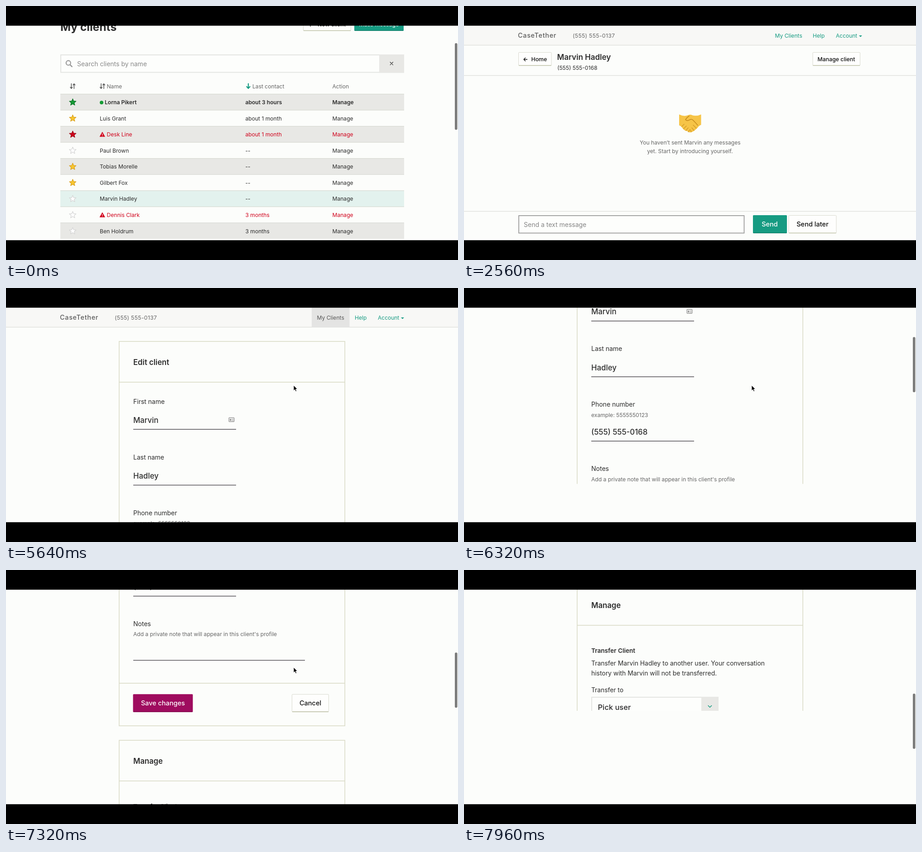
Animation, 998 px wide and 561 px high, one loop 8 s. Source, as an HTML page:

```html
<!DOCTYPE html>
<html lang="en">
<head>
<meta charset="utf-8">
<title>Client messaging walkthrough</title>
<style>
  html, body { margin: 0; width: 100%; height: 100%; overflow: hidden; background: #000; }
  svg { display: block; width: 100vw; height: 100vh; }
  text { font-family: Inter, "Liberation Sans", sans-serif; white-space: pre; }
</style>
</head>
<body>
<svg id="stage" viewBox="0 0 998 561"></svg>
<script>
const LOOP = 8000;
const PAPER = '#fcfdfb', INK = '#2c2c2c', GREY = '#666', TEAL = '#169b82', RED = '#d0021b', PANEL = '#dcddca';
const PERSON = { first: 'Marvin', last: 'Hadley', phone: '(555) 555-0168' };
const FULL_NAME = `${PERSON.first} ${PERSON.last}`;

// --- drawing helpers: text y is the middle of the capitals ---
const text = (x, y, size, str, { fill = INK, weight = 400, anchor = 'start', gap = 0 } = {}) =>
  `<text x="${x}" y="${y + size * 0.364}" font-size="${size}" font-weight="${weight}" fill="${fill}" text-anchor="${anchor}" letter-spacing="${gap}">${str}</text>`;
const rect = (x, y, w, h, fill, extra = '') =>
  `<rect x="${x}" y="${y}" width="${w}" height="${h}" fill="${fill}" ${extra}/>`;
const path = (d, fill, extra = '') => `<path d="${d}" fill="${fill}" ${extra}/>`;
const line = (x1, x2, y, color, width = 1) => rect(x1, y - width / 2, x2 - x1, width, color);
const stroke = (d, color, width) =>
  path(d, 'none', `stroke="${color}" stroke-width="${width}" stroke-linecap="round" stroke-linejoin="round"`);
const group = (id, body) => `<g id="${id}">${body}</g>`;

const outlineButton = (x, y, w, h) =>
  rect(x + .5, y + .5, w - 1, h - 1, '#fefefd', 'rx="1.5" stroke="#d9dacf"') + line(x + 1, x + w - 1, y + h - .6, '#b9bda0', 1.4);
const solidButton = (x, y, w, h, fill, shade) =>
  rect(x, y, w, h, fill, 'rx="1.5"') + line(x + 1, x + w - 1, y + h - .6, shade, 1.2);

function star(cx, cy, fill, edge) {
  const points = Array.from({ length: 10 }, (_, i) => {
    const r = i % 2 ? 3.5 : 7.8, a = i * Math.PI / 5 - Math.PI / 2;
    return `${(cx + r * Math.cos(a)).toFixed(2)},${(cy + r * Math.sin(a)).toFixed(2)}`;
  });
  return `<polygon points="${points.join(' ')}" fill="${fill}" stroke="${edge}" stroke-width="1.2" stroke-linejoin="round"/>`;
}
const warning = (x, y) =>
  path(`M${x + 5.7} ${y - 5.5}l5.7 10.3h-11.4z`, RED, `stroke="${RED}" stroke-linejoin="round" stroke-width=".6"`) +
  rect(x + 5.1, y - 2, 1.2, 3.4, '#fff') + rect(x + 5.1, y + 2.3, 1.2, 1.2, '#fff');
const sortIcon = (x, y) =>
  stroke(`M${x + 3} ${y - 5.5}v10.5m-2.3-2.6l2.3 2.8l2.3-2.8M${x + 9} ${y + 5.5}v-10.5m-2.3 2.6l2.3-2.8l2.3 2.8`, '#555', 1.5);

// --- client list ---
const TONES = {
  green: ['#159b35', '#0b7425'], gold: ['#f8c630', '#d9a01d'],
  red: ['#d0021b', '#9c0014'], none: ['#fefefe', '#d4d4d4']
};
const SHADE = '#e8e8e5';
const CLIENTS = [
  ['Lorna Pikert', 'about 3 hours', 'green', SHADE, 'new'],
  ['Luis Grant', 'about 1 month', 'gold', PAPER],
  ['Desk Line', 'about 1 month', 'red', SHADE, 'alert'],
  ['Paul Brown', '--', 'none', PAPER],
  ['Tobias Morelle', '--', 'gold', SHADE],
  ['Gilbert Fox', '--', 'gold', PAPER],
  [FULL_NAME, '--', 'none', '#e3f2ee'],
  ['Dennis Clark', '3 months', 'none', PAPER, 'alert'],
  ['Ben Holdrum', '3 months', 'none', SHADE]
];

function clientRow([name, contact, tone, back, state], i) {
  const top = 194.5 + i * 35.55, y = top + 18.2;
  const style = { fill: state === 'alert' ? RED : INK, weight: state === 'new' ? 600 : 400 };
  const nameX = { new: 218, alert: 222.5 }[state] || 207;
  const badge = state === 'new' ? `<circle cx="211" cy="${y + .6}" r="4" fill="#159b35"/>`
    : state === 'alert' ? warning(207, y) : '';
  return rect(120, top, 759, 35.55, back) + line(120, 879, top, '#d3d5cd') +
    star(147.3, y, ...TONES[tone]) + badge +
    text(nameX, y, 12.1, name, style) + text(528.5, y, 12.1, contact, style) + text(720.5, y, 12.1, 'Manage', style);
}

const listPage = () =>
  text(120, 46, 24.6, 'My clients', { weight: 700 }) +
  outlineButton(656, 20, 106, 35) + stroke('M668 41h8m-4-4v8', INK, 1.4) +
  text(688, 41, 12.3, 'New client', { weight: 500, fill: '#111' }) +
  solidButton(769, 20, 109, 35, TEAL, '#0f7a66') +
  text(823.5, 41, 12.3, 'Mass message', { weight: 500, fill: '#fff', anchor: 'middle' }) +
  rect(121, 108, 757, 38.5, '#fdfefc', 'stroke="#e4e5e2" stroke-width="2"') + rect(824, 107, 55, 40.5, SHADE) +
  stroke('M848.2 124l6.2 6.2m0-6.2l-6.2 6.2', '#333', 1.2) +
  `<circle cx="137.7" cy="125.7" r="5" fill="none" stroke="#999" stroke-width="2.2"/>` + stroke('M141.6 129.8l4 4', '#999', 2.6) +
  text(157, 127.7, 14, 'Search clients by name', { fill: '#888' }) +
  sortIcon(141.3, 177) + sortIcon(207, 177) + text(222.5, 178, 12.1, 'Name', { fill: GREY }) +
  stroke('M535 171.5v10m-3.6-3.4l3.6 4l3.6-4', TEAL, 2.2) +
  text(544, 178, 12.1, 'Last contact', { fill: GREY }) + text(720.5, 178, 12.1, 'Action', { fill: GREY }) +
  CLIENTS.map(clientRow).join('');

// --- shared navigation ---
const nav = active =>
  rect(0, 43, 998, 43.5, '#f8f8f6') + line(0, 998, 86.5, '#dededb', 1.4) +
  (active ? rect(675, 43, 83.5, 43.5, '#e4e4e3') : '') +
  text(119, 65, 14.4, 'CaseTether', { fill: '#5c5c5c', weight: 500, gap: .7 }) +
  text(240, 65.3, 12.3, '(555) 555-0137', { fill: GREY, gap: .3 }) +
  text(686.5, 65.3, 12.1, 'My Clients', { fill: active ? '#555' : TEAL }) +
  text(770, 65.3, 12.1, 'Help', { fill: TEAL }) + text(821, 65.3, 12, 'Account', { fill: TEAL }) +
  path('M872 65h7l-3.5 3.6z', TEAL);

// --- conversation ---
const handshake = () =>
  path('M475 239.5q11 5.5 20 1.5q5-2 9 .2q10 3 19.500-1.700v23q-5 2-7 5.500q-6 7-14 10.500q-6 2-9-2q-8-1-12-8q-3-4-6.500-5z', '#f6c447') +
  stroke('M497 243q-5 3-8 8q3 4 9 .5q5-3 8 1q6 6 10 11', '#c58a1c', 1.5) +
  stroke('M481 266l5-5m-1 10l6-6m-1 10l5-6m0 9l4-5M502 278l-2-4m8 1l-5-6m10 1l-7-7', '#d59b27', 1.5);

const chatPage = () => nav(false) +
  outlineButton(120, 102, 73.5, 30) + stroke('M139.500 118h-7.500m3.400-3.400l-3.400 3.400l3.400 3.400', '#111', 1.4) +
  text(148.500, 117.5, 12.3, 'Home', { weight: 500, fill: '#111' }) +
  text(205.5, 112.5, 17, FULL_NAME, { weight: 600 }) + text(206, 136.5, 12.1, PERSON.phone) +
  outlineButton(769.5, 102, 105.5, 30) +
  rect(770.2, 102.7, 104, 28, '#d8d9cd', 'id="press" stroke-width="1.500"') +
  text(822, 117.5, 12.3, 'Manage client', { weight: 500, fill: '#111', anchor: 'middle' }) +
  line(0, 998, 153.5, '#dededb', 1.4) + handshake() +
  text(499.3, 301.5, 12.1, `You haven’t sent ${PERSON.first} any messages`, { fill: GREY, anchor: 'middle' }) +
  text(499, 320.5, 12.1, 'yet. Start by introducing yourself.', { fill: GREY, anchor: 'middle' }) +
  line(0, 998, 453.5, '#dededb', 1.4) +
  rect(121, 463, 497.5, 38.5, '#fdfefc', 'stroke="#9b9b9b" stroke-width="1.8"') +
  text(132, 483, 14, 'Send a text message', { fill: '#858585' }) +
  solidButton(638, 462, 75, 40, TEAL, '#0f7a66') +
  text(675, 482, 14.5, 'Send', { weight: 500, fill: '#fff', anchor: 'middle' }) +
  outlineButton(716.5, 462, 106, 40) +
  text(769.5, 482, 14.6, 'Send later', { weight: 500, fill: '#111', anchor: 'middle' });

// --- edit form, laid out in unscrolled coordinates ---
const panel = (y, h) => rect(249.8, y, 498.4, h, 'none', `stroke="${PANEL}" stroke-width="1.7"`);
const field = (label, labelY, value, valueY) =>
  text(281, labelY, 14, label) + text(281, valueY, 16.8, value, { weight: 500 }) + line(281, 508, valueY + 20.7, '#5d5a60', 1.6);

const editPage = () => nav(true) +
  panel(118, 746) + text(281, 163.5, 16.7, 'Edit client', { weight: 600 }) + line(250, 748, 208, PANEL, 1.7) +
  field('First name', 250.5, PERSON.first, 291.5) +
  rect(492.2, 286.5, 11.5, 8.8, 'none', 'rx="1" stroke="#999" stroke-width="1.400"') +
  rect(494, 289, 3.4, 4.4, '#999') + stroke('M499 289.3h3m-3 2h3m-3 2h3', '#999', .9) +
  field('Last name', 373.5, PERSON.last, 414.7) +
  field('Phone number', 496.5, PERSON.phone, 556.8) + text(281, 519.5, 12.1, 'example: 5555550123', { fill: GREY }) +
  text(281, 638.5, 14, 'Notes') +
  text(281, 661.500, 12.1, 'Add a private note that will appear in this client\'s profile', { fill: GREY }) +
  line(281, 660, 719.3, '#5d5a60', 1.6) + line(250, 748, 770, PANEL, 1.7) +
  solidButton(280.5, 794, 132, 39.5, '#9f0c5f', '#7a0748') +
  text(346.5, 813.2, 14.5, 'Save changes', { weight: 500, fill: '#fff', anchor: 'middle' }) +
  outlineButton(631, 794, 82, 39.5) + text(672, 813.2, 14.5, 'Cancel', { weight: 500, fill: '#111', anchor: 'middle' }) +
  panel(896, 620) + text(281, 941.5, 16.7, 'Manage', { weight: 600 }) + line(250, 748, 985.7, PANEL, 1.7) +
  text(281, 1041.8, 13.6, 'Transfer Client', { weight: 600 }) +
  text(281, 1069.7, 13.9, `Transfer ${FULL_NAME} to another user. Your conversation`) +
  text(281, 1091.7, 13.9, `history with ${PERSON.first} will not be transferred.`) +
  text(281, 1128.8, 13.8, 'Transfer to') +
  rect(282, 1144.5, 279, 44, '#fdfefc', 'stroke="#e4e5e2" stroke-width="2"') + rect(524, 1143.500, 38, 46, SHADE) +
  text(295.5, 1166, 16.5, 'Pick user', { weight: 500 }) + stroke('M539.200 1163l3.700 3.700l3.700-3.700', TEAL, 1.6);

const arrow = path('M0 0v11.800l2.700-2.500l1.900 4.200l2.100-.9l-1.900-4.100h3.700z', '#000', 'stroke="#fff" stroke-width=".9"');
const hand = path('M-2.500-6q1.600-1 2 .8l.6 3q1.200-.9 2 .1q1.200-.6 1.900.4q1.500-.3 1.700 1.500q.2 4-1.600 6.300h-5.800q-1.200-2.500-3.200-4.600q-.6-1.700 1.200-1.300l1.700 1.200z', '#fff', 'stroke="#222" stroke-width="1"');

const stage = document.getElementById('stage');
stage.innerHTML = rect(0, 43, 998, 475, PAPER) +
  group('list', listPage()) + group('chat', chatPage()) +
  group('edit', editPage() + rect(0, 0, 998, 1100, PAPER, 'id="unpainted"')) +
  rect(991, 0, 5.5, 122, '#7b7b7b', 'id="bar" rx="2.700"') + group('arrow', arrow) + group('hand', hand) +
  rect(0, 0, 998, 43.5, '#000') + rect(0, 517.3, 998, 44, '#000');

const el = Object.fromEntries([...stage.querySelectorAll('[id]')].map(n => [n.id, n]));
const set = (node, attrs) => Object.entries(attrs).forEach(([k, v]) => node.setAttribute(k, v));
const show = (node, on) => node.setAttribute('visibility', on ? 'visible' : 'hidden');

// --- motion ---
const clamp = v => Math.max(0, Math.min(1, v));
const smooth = v => v * v * (3 - 2 * v);
function track(keys, t, ease = v => v) {
  const i = keys.findIndex(k => k[0] > t);
  if (i === 0) return keys[0][1];
  if (i < 0) return keys[keys.length - 1][1];
  const [t0, a] = keys[i - 1], [t1, b] = keys[i];
  return a + (b - a) * ease((t - t0) / (t1 - t0));
}
const SCROLL = [[5840, 0], [5960, 18], [6120, 90], [6320, 238.5], [6440, 335], [6560, 418], [6680, 468], [6840, 502],
  [7080, 518], [7280, 518], [7320, 519.5], [7480, 572], [7640, 660], [7800, 765], [7960, 863.5]];
const POINTER_X = [[3040, 500], [3240, 560], [3360, 560], [3600, 680], [3840, 680], [4160, 819], [5080, 819], [5600, 635]];
const POINTER_Y = [[3040, 400], [3240, 350], [3360, 350], [3600, 245], [3840, 245], [4160, 118], [5080, 118], [5600, 215]];

function render(t) {
  const onList = t < 2560, onEdit = t >= 5080, onChat = !onList && !onEdit;
  show(el.list, onList);
  show(el.chat, onChat);
  show(el.edit, onEdit);

  const scroll = track(SCROLL, t);
  set(el.edit, { transform: `translate(0 ${-scroll})` });
  set(el.unpainted, { y: t < 6440 ? 672 : 1174.5 });

  const listBar = 1 - clamp((t - 120) / 280);
  set(el.bar, onList
    ? { y: 82, height: 191.5, opacity: listBar }
    : { y: 45 + scroll * .264, height: 122, opacity: t >= 5880 ? 1 : 0 });

  const overButton = t >= 4080 && onChat;
  show(el.press, overButton);
  set(el.press, { 'fill-opacity': t < 4560 ? .6 : 1, stroke: t < 4560 ? '#c9cbb9' : '#63c4b4' });

  const at = `translate(${track(POINTER_X, t, smooth)} ${track(POINTER_Y, t, smooth)})`;
  set(el.arrow, { transform: at });
  set(el.hand, { transform: at });
  show(el.hand, overButton);
  // the pointer is off screen once the last flick carries the form away
  show(el.arrow, t >= 3080 && !overButton && t < 7800);
}

const start = performance.now();
function tick() {
  render((performance.now() - start) % LOOP);
  requestAnimationFrame(tick);
}
render(0);
requestAnimationFrame(tick);
</script>
</body>
</html>
```
